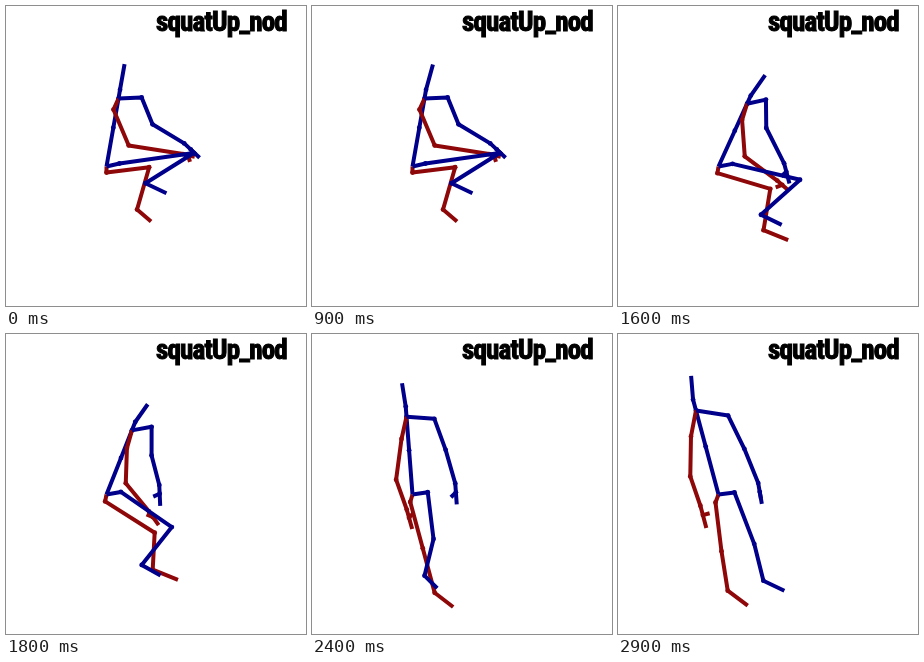
These frames come from a looping animation (300x300 px, 3 s). An HTML page with a canvas:

```html
<!DOCTYPE html>
<html>
<head>
<meta charset="utf-8">
<style>
  html, body { margin: 0; width: 100%; height: 100%; overflow: hidden; background: #fff; }
  canvas { display: block; }
</style>
</head>
<body>
<canvas id="stage" width="300" height="300"></canvas>
<script>
const ctx = document.getElementById('stage').getContext('2d');
const LOOP = 3000, STEP = 100, RISE_START = 900, RISE_END = 2900;
const BLUE = '#00008b', RED = '#8e080a';
const TITLE = 'squatUp_nod';
const PELVIS = [100, 160];

// Swing (degrees, clockwise from right) and projected length of each bone
// from squat to stand; the values are evenly spaced over the rise.
const bones = {
  blue: {
    upperArm: { swing: [68, 86, 89, 70, 64], length: [29, 29, 37] },
    forearm: { swing: [31, 51, 79, 74, 68], length: [37, 46, 28, 35, 37] },
    thigh: { swing: [-8, -3, 22, 76, 82, 69], length: [75, 71, 67, 44, 49, 55] },
    shank: { swing: [148, 141, 135, 105, 102, 76], length: [57, 53, 39, 38] }
  },
  red: {
    upperArm: { swing: [67, 70, 90, 93, 98, 91], length: [39, 38, 35, 41, 40] },
    forearm: { swing: [9, 10, 45, 62, 72, 71], length: [55, 35, 31] },
    thigh: { swing: [-7, 4, 23, 64, 77, 83], length: [43, 51, 59, 48, 49] },
    shank: { swing: [106, 104, 90, 75, 81], length: [44, 46, 36, 46, 40] }
  }
};
const leanKeys = [10, 20, 24, 9, -8, -15];
const nodKeys = [4, 3, 9, 8, -5, 7];

const clamp = x => Math.min(1, Math.max(0, x));
const lerp = (a, b, u) => a + (b - a) * u;
const smooth = u => u * u * (3 - 2 * u);
const bump = (t, peak, width) => Math.exp(-(((t - peak) / width) ** 2));
const offset = ([x, y], dx, dy) => [x + dx, y + dy];
const polar = ([x, y], deg, length) => {
  const a = deg * Math.PI / 180;
  return [x + length * Math.cos(a), y + length * Math.sin(a)];
};

// Catmull-Rom through evenly spaced keys, u from 0 to 1.
function curve(keys, u) {
  const n = keys.length - 1;
  const i = Math.min(n - 1, Math.floor(u * n)), f = u * n - i;
  const key = k => keys[Math.min(n, Math.max(0, k))];
  const slope = k => (key(k + 1) - key(k - 1)) / 2;
  return lerp(key(i), key(i + 1), smooth(f))
    + f * (1 - f) * ((1 - f) * slope(i) - f * slope(i + 1));
}

const follow = (from, bone, u) => polar(from, curve(bone.swing, u), curve(bone.length, u));

function chain(points, color) {
  ctx.strokeStyle = ctx.fillStyle = color;
  ctx.lineWidth = 4;
  ctx.lineJoin = 'round';
  ctx.beginPath();
  points.forEach(p => ctx.lineTo(...p));
  ctx.stroke();
  for (const [x, y] of points.slice(1, -1)) {
    ctx.beginPath();
    ctx.arc(x, y, 2.4, 0, Math.PI * 2);
    ctx.fill();
  }
}

function drawSpine(t, u) {
  const up = curve(leanKeys, u) - 90;
  const length = lerp(69, 87, smooth(clamp((t - 1900) / 1000)));
  const neck = polar(PELVIS, up, length);
  const nod = curve(nodKeys, u) * clamp(t / RISE_START);
  const head = polar(neck, up + nod, 35 - 7 * bump(t, 2000, 300));
  chain([PELVIS, polar(PELVIS, up, length * 0.57), neck, polar(PELVIS, up, length * 1.13), head], BLUE);
  return neck;
}

function drawArm(neck, shoulder, { upperArm, forearm }, hand, u, color) {
  const elbow = follow(shoulder, upperArm, u);
  const wrist = follow(elbow, forearm, u);
  const aim = curve(forearm.swing, u) + hand.bend;
  const palm = polar(wrist, aim, hand.length * 0.42);
  chain([neck, shoulder, elbow, wrist, palm, polar(wrist, aim, hand.length)], color);
  chain([palm, polar(palm, aim + hand.thumb, 7)], color);
}

function drawLeg(hip, { thigh, shank }, foot, u, color) {
  const knee = follow(hip, thigh, u);
  const ankle = follow(knee, shank, u);
  chain([PELVIS, hip, knee, ankle, offset(ankle, ...foot)], color);
}

function drawFigure(t) {
  const u = clamp((t - RISE_START) / (RISE_END - RISE_START));
  const neck = drawSpine(t, u);

  const reach = bump(t, 1700, 200);
  drawLeg(offset(PELVIS, -3 * u, 6 + 2 * u), bones.red,
    [14 + 6 * u + 11 * reach, 12 + 3 * u - 4 * reach], u, RED);
  drawArm(neck, offset(neck, -5, 11 + 15 * u), bones.red,
    { bend: 4, length: 12 + 11 * u, thumb: 60 + 210 * smooth(u) }, u, RED);

  const plant = bump(t, 2200, 300), back = 128 - neck[0];
  drawLeg(offset(PELVIS, 13 + 3 * u, -3 + u), bones.blue,
    [21 - 13 * plant, 10 + 4 * plant], u, BLUE);
  drawArm(neck, offset(neck, 19 + 0.26 * back, -4 + 0.18 * back), bones.blue,
    { bend: 12, length: 21, thumb: 70 * Math.sin(Math.PI * u) }, u, BLUE);
}

function setTitleFont(size) {
  ctx.font = `bold ${size}px "Roboto Condensed", "Open Sans Condensed", "Liberation Sans Narrow", Roboto, sans-serif`;
  ctx.letterSpacing = `${-0.03 * size}px`;
}
setTitleFont(100);
const titleSize = 131 * 100 / ctx.measureText(TITLE).width;

function drawTitle() {
  setTitleFont(titleSize);
  ctx.fillStyle = ctx.strokeStyle = '#000';
  ctx.lineWidth = 1;
  ctx.fillText(TITLE, 150, 25);
  ctx.strokeText(TITLE, 150, 25);
}

function draw() {
  const t = Math.floor(performance.now() % LOOP / STEP) * STEP;
  ctx.fillStyle = '#fff';
  ctx.fillRect(0, 0, 300, 300);
  drawTitle();
  ctx.save();
  ctx.translate(0.5, 0.5);
  drawFigure(t);
  ctx.restore();
  requestAnimationFrame(draw);
}
draw();
</script>
</body>
</html>
```
